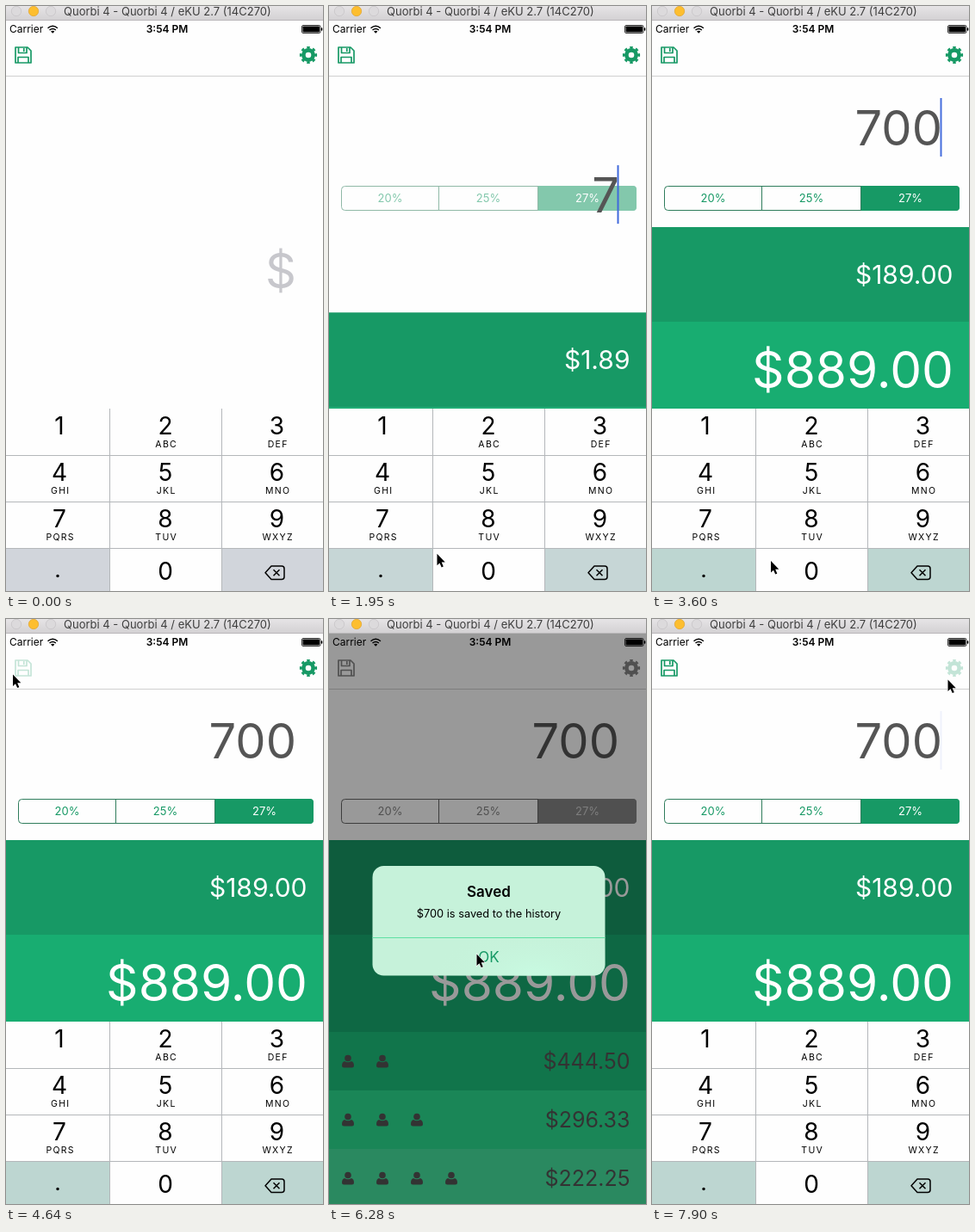
Write an HTML page that moves like this. It is 368 px wide and 680 px high and loops after 8000 ms.

```html
<!DOCTYPE html>
<html lang="en">
<head>
<meta charset="utf-8">
<title>Tip calculator</title>
<style>
  html, body { margin: 0; width: 100%; height: 100%; overflow: hidden; background: #fefefe; }
  svg { display: block; width: 100%; height: 100%; font-family: Inter, "Open Sans", sans-serif;
        --dim: 0%; --tint: color-mix(in srgb, #858585 var(--dim), #179965); }
  .tint { fill: var(--tint); }
  .line { fill: none; stroke: var(--tint); }
  .edge { stroke: color-mix(in srgb, #666 var(--dim), #2f7d5c); }
  .chosen { fill: color-mix(in srgb, #d0d0d0 var(--dim), #fff); }
  .mid { text-anchor: middle; }
  .end { text-anchor: end; }
</style>
</head>
<body>
<svg id="stage" viewBox="0 0 368 680"></svg>
<script>
const LOOP = 8000;
const TICK = 150;
const TICK_STARTS = [0, 4640, 6270, 7300];
const SAVE_TAP = 4640, OK_TAP = 6300, GEAR_TAP = 7900;
const TYPED = [[90, ''], [1850, '7'], [2700, '70'], [3150, '700'], [OK_TAP, '700']];
const MOVE_TIME = 750;
const POINTER_START = [125, 740];
const POINTER_MOVES = [[600, 80, 607], [1650, 138, 645], [3600, 8, 64.5], [5090, 171.5, 389.5], [6700, 343.5, 70.5]];

const stage = document.getElementById('stage');

const text = (x, y, size, content, attrs = '') =>
  `<text x="${x}" y="${y}" font-size="${size}" ${attrs}>${content}</text>`;
const rect = (x, y, w, h, attrs = '') =>
  `<rect x="${x}" y="${y}" width="${w}" height="${h}" ${attrs}/>`;

const person = (x, y) => `<g fill="#555"><circle cx="${x}" cy="${y - 3.5}" r="3.8"/>
  <path d="M${x - 4} ${y}q-3 1-3 5q0 2.500 2.500 2.500h9q2.500 0 2.500-2.500q0-4-3-5q-4 2.500-8 0z"/></g>`;

function splitRow(people) {
  const y = 480 + (people - 2) * 68;
  const color = ['#1cc37d', '#2bde91', '#45e4a0'][people - 2];
  const icons = Array.from({ length: people }, (_, i) => person(22 + i * 40, y + 34));
  return rect(0, y, 368, 68.5, `fill="${color}"`) + icons.join('') +
    text(349.5, y + 43, 25, '', `class="end" fill="#555" id="split${people}"`);
}

function keypad() {
  const letters = ['', 'ABC', 'DEF', 'GHI', 'JKL', 'MNO', 'PQRS', 'TUV', 'WXYZ'];
  const columns = [62, 185, 314.5];
  const keys = letters.map((label, i) => {
    const x = columns[i % 3], y = 498 + Math.floor(i / 3) * 54;
    return text(x, y, 28, i + 1, 'class="mid"') +
      text(x + 1.2, y + 15, 10.5, label, 'class="mid" letter-spacing="1.3"');
  });
  return rect(0, 468, 368, 216, 'fill="#fefefe"') +
    `<g id="sideKeys">${rect(0, 630, 120, 54)}${rect(250, 630, 118, 54)}</g>
    <path d="M120.500 468v216M250.500 468v216M0 522.500h368M0 576.500h368M0 630.500h368" stroke="#b4b7ba"/>
    ${keys.join('')}${text(185, 667, 28, 0, 'class="mid"')}
    <circle cx="60" cy="662.500" r="1.700"/>
    <path d="M308 651h12q3 0 3 3v9.500q0 3-3 3h-12l-7-7.800zM310.500 655.300l7 7m0-7l-7 7"
      fill="none" stroke="#000" stroke-width="1.500" stroke-linejoin="round"/>`;
}

const segments = `<g id="segments">
  ${rect(14.5, 209.5, 342, 28, 'rx="4" class="edge" fill="#fefefe"')}
  <path class="tint" d="M242 209h111q4 0 4 4v21q0 4-4 4h-111z"/>
  <path class="edge" d="M127.500 209v29M242.500 209v29"/>
  ${text(71, 228, 13, '20%', 'class="mid tint"')}
  ${text(185, 228, 13, '25%', 'class="mid tint"')}
  ${text(300, 228, 13, '27%', 'class="mid chosen"')}</g>`;

const navBar = `<path d="M0 81.500h368" stroke="#cfcfcf"/>
  <g id="save" class="line" stroke-width="1.700" stroke-linejoin="round">
    <path d="M11 48h14l4 4v14h-18zM14.500 48v6.500h9.500v-6.500M14 66v-6.500h12v6.500M20.800 49v4"/></g>
  <g id="gear" class="line">
    <circle cx="351" cy="57" r="5.600" stroke-width="4.600"/>
    <circle cx="351" cy="57" r="8.500" stroke-width="3.200" pathLength="16" stroke-dasharray="1" stroke-dashoffset=".5"/></g>
  ${text(4, 31, 12, 'Carrier')}
  <path d="M48.500 25.800q5.700-5 11.400 0M50.500 28q3.700-3 7.400 0" fill="none" stroke="#000" stroke-width="1.500"/>
  <path d="M54.200 31.800l-2.200-2.300q2.200-1.500 4.400 0z"/>
  ${text(187, 31, 12, '3:54 PM', 'class="mid" font-weight="600"')}
  ${rect(343.5, 22.5, 21.5, 9, 'rx="1.5" fill="none" stroke="#000" stroke-width=".8"')}
  ${rect(344.5, 23.5, 19.5, 7, 'rx=".7"')}${rect(365.7, 25.3, 1.6, 3.5, 'rx=".7"')}`;

const alertBox = `<g id="alert">
  ${rect(50.5, 287, 270, 127.5, 'rx="13" fill="#c6f2da"')}
  ${rect(50.5, 287, 270, 127.5, 'rx="13" fill="url(#glow)"')}
  <path d="M50.500 370.500h270" stroke="#5fe0a4"/>
  ${text(185.5, 322.5, 17, 'Saved', 'class="mid" font-weight="600"')}
  ${text(185.5, 346.5, 12.8, '$700 is saved to the history', 'class="mid"')}
  ${text(185.5, 399, 17, 'OK', 'class="mid" fill="#179965"')}</g>`;

const windowButton = (x, fill, edge) =>
  `<circle cx="${x}" cy="6" r="5.700" fill="${fill}" stroke="${edge}" stroke-width=".7"/>`;
const titleBar = rect(0, 0, 368, 17, 'fill="url(#chrome)"') +
  `<path d="M0 16.500h368" stroke="#b9b7b9"/>` +
  windowButton(12, '#dcdadc', '#c4c2c4') +
  windowButton(32, '#fdbe2f', '#e0a32a') +
  windowButton(52, '#dcdadc', '#c4c2c4') +
  text(67, 11, 13, 'Quorbi 4 - Quorbi 4 / eKU 2.7 (14C270)', 'fill="#3d3d3d"');

stage.innerHTML = `<defs>
    <linearGradient id="chrome" x2="0" y2="1"><stop stop-color="#e6e4e6"/><stop offset="1" stop-color="#d2d0d2"/></linearGradient>
    <radialGradient id="glow" cx=".7" cy="1" r=".45"><stop stop-color="#c8fbe2"/><stop offset="1" stop-color="#c6f2da" stop-opacity="0"/></radialGradient>
  </defs>
  ${rect(0, 0, 368, 680, 'fill="#fefefe"')}
  ${segments}
  <g id="field">${text(337, 161.5, 56, '', 'class="end" id="amount"')}
    ${rect(334.5, 107, 2, 68, 'id="caret" fill="#4069dc"')}</g>
  <g id="panels">
    ${rect(0, 257, 368, 110.5, 'fill="#179965"')}${rect(0, 367, 368, 113.5, 'fill="#18ad71"')}
    ${text(349.5, 323, 30, '', 'class="end" fill="#fff" id="tip"')}
    ${text(350, 444, 58.5, '', 'class="end" fill="#fff" id="total"')}
    ${[2, 3, 4].map(splitRow).join('')}</g>
  <g id="keypad">${keypad()}</g>
  ${navBar}
  ${rect(0, 17, 368, 663, 'id="shade"')}
  ${alertBox}${titleBar}
  <path id="pointer" d="M0 0V13.500L3 10.700L5.200 15.600L7.300 14.700L5.200 9.800H9.300Z" stroke="#fff" stroke-width="1.200" paint-order="stroke"/>`;

const el = Object.fromEntries([...stage.querySelectorAll('[id]')].map(node => [node.id, node]));

const clamp = v => Math.min(1, Math.max(0, v));
const easeOut = (t, start, duration) => 1 - (1 - clamp((t - start) / duration)) ** 3;
const blink = age => clamp(.5 + 1.5 * Math.cos(2 * Math.PI * (age - 240) / 1050));
const move = (node, x, y) => node.setAttribute('transform', `translate(${x} ${y})`);
const money = value => '$' + value.toFixed(2);

function toTick(time) {
  const start = TICK_STARTS.findLast(s => s <= time);
  return start + Math.floor((time - start) / TICK) * TICK;
}

function pointerAt(t) {
  return POINTER_MOVES.reduce(([x, y], [start, toX, toY]) => {
    const k = easeOut(t, start, MOVE_TIME);
    return [x + (toX - x) * k, y + (toY - y) * k];
  }, POINTER_START);
}

function render(time) {
  const t = toTick(time);
  const reveal = easeOut(t, 1850, 450);
  const appear = easeOut(t, SAVE_TAP + 50, 380);
  const modal = appear - easeOut(t, OK_TAP, 380);

  const [typedAt, amount] = TYPED.findLast(([at]) => at <= t) ?? [Infinity, ''];
  const total = amount * 1.27;
  el.amount.textContent = amount || '$';
  el.amount.setAttribute('fill', amount ? '#555' : '#c7c7cc');
  el.tip.textContent = money(amount * .27);
  el.total.textContent = money(total);
  for (const people of [2, 3, 4]) el['split' + people].textContent = money(total / people);

  const focused = t >= TYPED[0][0] && (t < SAVE_TAP || t >= OK_TAP);
  el.caret.style.opacity = focused ? blink(t - typedAt) : 0;

  move(el.field, 0, 166 * (1 - reveal));
  move(el.panels, 0, 211 * (1 - reveal));
  move(el.keypad, 0, Math.round(216 * modal));
  move(el.pointer, ...pointerAt(t));
  el.segments.style.opacity = reveal;
  el.sideKeys.style.fill = `color-mix(in srgb, #bdd6d1 ${reveal * 100}%, #d1d5db)`;

  stage.style.setProperty('--dim', modal * 100 + '%');
  el.shade.style.opacity = modal * .4;
  el.alert.style.opacity = modal;
  el.alert.setAttribute('transform',
    `translate(185.5 350.75) scale(${1.15 - .15 * appear}) translate(-185.5 -350.75)`);

  el.save.style.opacity = t === SAVE_TAP ? .25 : 1;
  el.gear.style.opacity = t >= GEAR_TAP ? .25 : 1;
}

const begin = performance.now();
function loop() {
  render((performance.now() - begin) % LOOP);
  requestAnimationFrame(loop);
}
loop();
</script>
</body>
</html>
```
